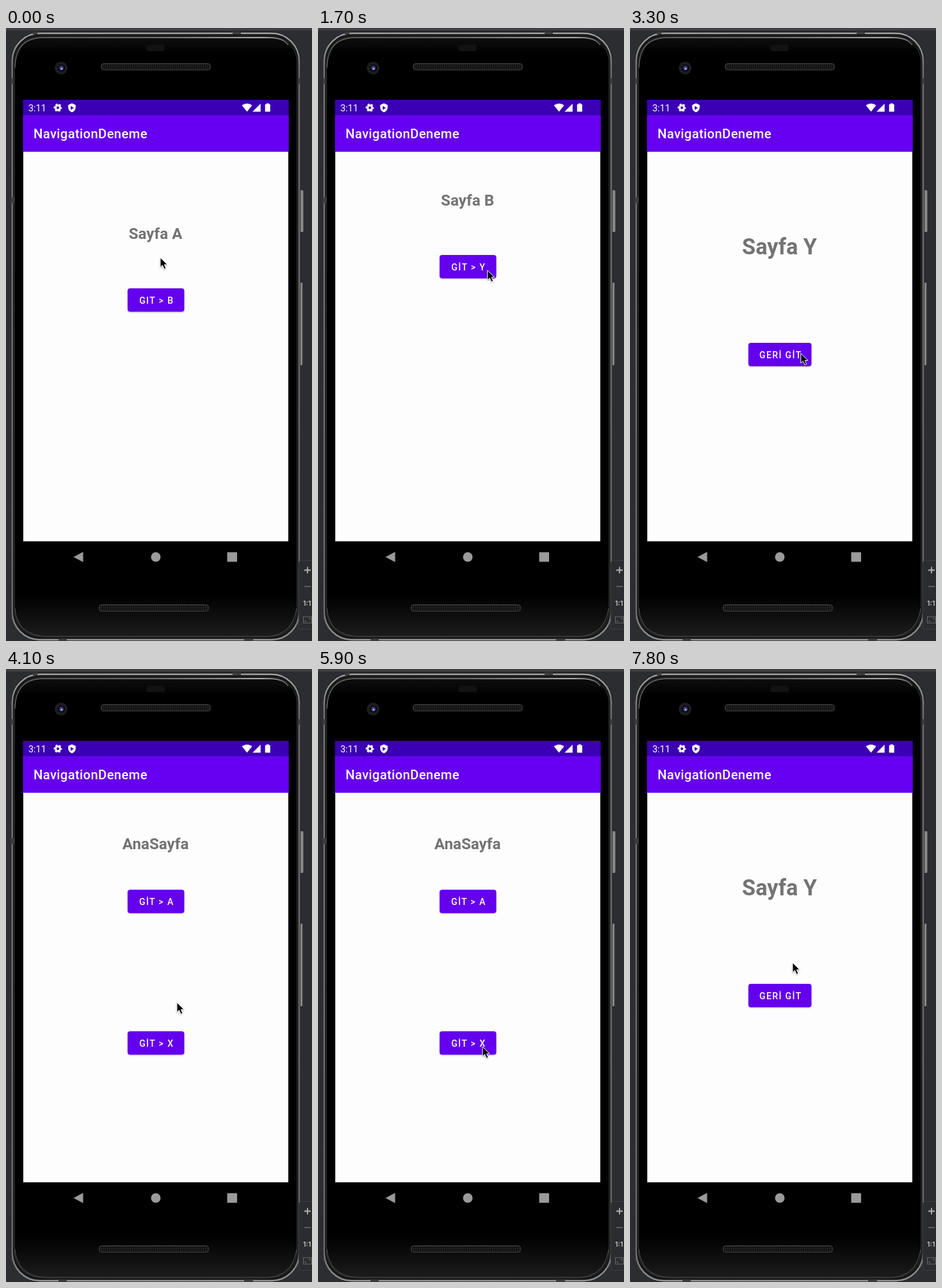
Recreate the animation shown at these times as an HTML page. Size 478x956 px, loop 8000 ms.

```html
<!DOCTYPE html>
<html lang="tr">
<head>
<meta charset="utf-8">
<style>
  html, body { margin: 0; width: 100%; height: 100%; overflow: hidden; background: #2c2d30; }
  svg { display: block; width: 100vw; height: 100vh; font-family: Roboto, sans-serif; }
  .title { font-weight: 700; fill: #737373; text-anchor: middle; }
  .label { font-weight: 500; font-size: 14.1px; letter-spacing: 1.35px; fill: #fff; text-anchor: middle; }
  .btn { fill: #6400ee; filter: drop-shadow(0 1px 1px rgba(0,0,0,.22)); }
  .pressed .btn { filter: drop-shadow(0 3px 3px rgba(0,0,0,.32)); }
</style>
</head>
<body>
<svg viewBox="0 0 478 956" preserveAspectRatio="none">
  <defs>
    <linearGradient id="body" x2="0" y2="1">
      <stop offset="0" stop-color="#101010"/><stop offset=".03" stop-color="#000"/>
      <stop offset=".93" stop-color="#000"/><stop offset="1" stop-color="#1c1c1c"/>
    </linearGradient>
    <linearGradient id="rim" x2="0" y2="1">
      <stop offset="0" stop-color="#a0a0a0"/><stop offset=".06" stop-color="#707070"/>
      <stop offset=".95" stop-color="#686868"/><stop offset="1" stop-color="#959595"/>
    </linearGradient>
    <linearGradient id="shine">
      <stop offset="0" stop-color="#666"/><stop offset=".5" stop-color="#888"/>
      <stop offset=".9" stop-color="#ddd"/><stop offset="1" stop-color="#666"/>
    </linearGradient>
    <linearGradient id="key">
      <stop offset="0" stop-color="#444"/><stop offset=".6" stop-color="#999"/><stop offset="1" stop-color="#555"/>
    </linearGradient>
    <pattern id="mesh" width="3" height="3" patternUnits="userSpaceOnUse">
      <rect width="3" height="3" fill="#0c0c0c"/><circle cx="1.5" cy="1.5" r=".9" fill="#363636"/>
    </pattern>
    <rect id="speaker" x=".5" y=".5" width="171" height="10" rx="4" fill="url(#mesh)" stroke="#444"/>
  </defs>

  <rect width="478" height="956" fill="#2c2d30"/>
  <rect width="478" height="4" fill="#3d3f41"/>

  <g fill="url(#key)">
    <rect x="458" y="253" width="7" height="65" rx="2"/>
    <rect x="458" y="397" width="5.5" height="129" rx="2"/>
  </g>
  <rect x="8" y="6" width="452" height="949.5" rx="45" fill="#1a1a1a"/>
  <rect x="9.7" y="8.2" width="448.300" height="945.800" rx="43" fill="#161616" stroke="url(#rim)" stroke-width="2.600"/>
  <rect x="13.5" y="13" width="441" height="936" rx="40" fill="url(#body)" stroke="#303030"/>
  <path d="M14 62Q15 15 58 15H410Q434 15 441 27" fill="none" stroke="url(#shine)" stroke-width="1.3"/>
  <path d="M14 905Q17 947 62 949H408Q448 947 454 905" fill="none" stroke="#4a4a4a" stroke-width="1.2"/>
  <g fill="#3b3b3b">
    <rect x="7" y="78" width="5" height="9"/><rect x="7" y="264" width="6" height="9"/>
    <rect x="456" y="78" width="4" height="9"/>
    <rect x="42" y="6" width="7" height="4"/><rect x="354" y="6" width="13" height="4"/>
    <rect x="82" y="952" width="13" height="4"/><rect x="372" y="952" width="14" height="4"/>
  </g>

  <rect x="219" y="26" width="29" height="10" rx="4" fill="#121212"/>
  <circle cx="86" cy="62.5" r="10" fill="#1d1d1f"/>
  <circle cx="86.5" cy="62.5" r="6" fill="#0b0b16"/>
  <circle cx="86.5" cy="62.5" r="3.4" fill="#3a4080"/>
  <circle cx="87" cy="63.5" r="1.5" fill="#aab2ea"/>
  <use href="#speaker" x="148" y="55"/>
  <use href="#speaker" x="145" y="899"/>

  <rect x="27" y="112" width="414" height="688.5" fill="#fdfdfd"/>
  <rect x="26.5" y="112" width="415.2" height="24.5" fill="#3b00b3"/>
  <rect x="26.5" y="136" width="415.2" height="57" fill="#6600f0"/>
  <text x="35" y="130" font-size="14.4" fill="#fff">3:11</text>
  <text x="43" y="172" font-size="20.2" font-weight="500" letter-spacing=".38" fill="#fff">NavigationDeneme</text>

  <g fill="#fff">
    <circle cx="81" cy="124.3" r="3.6" fill="none" stroke="#fff" stroke-width="3"/>
    <circle cx="81" cy="124.3" r="5.5" fill="none" stroke="#fff" stroke-width="2" stroke-dasharray="2.88" stroke-dashoffset="1.44"/>
    <path d="M103 117.5L108.800 120V124.500Q108.300 129.500 103 131.500Q97.700 129.500 97.200 124.500V120Z"/>
    <path d="M101 121.5L106 124.6L101 127.7Z" fill="#3b00b3"/>
    <path d="M368.500 120.500Q376.500 115 384.500 120.500L376.500 130.500Z"/>
    <path d="M397.700 118V130.500H385.200Z"/>
    <path d="M406.700 117.500H410.700V119H412.700V130.500H404.700V119H406.700Z"/>
  </g>

  <g id="pages"></g>

  <g fill="#9a9a9a">
    <path d="M105.5 825L120.500 817V833Z"/>
    <circle cx="234" cy="825" r="7.5"/>
    <rect x="345.5" y="817.5" width="15.5" height="15" rx="1"/>
  </g>

  <rect x="457.5" y="830.5" width="26" height="107" rx="4" fill="#2b2c2f" stroke="#3d3e40"/>
  <path d="M466 845.5H476M471 840.5V850.5" stroke="#b4b4b4" stroke-width="1.8"/>
  <path d="M466 871H476" stroke="#66686a" stroke-width="1.5"/>
  <text x="464" y="901" font-size="10.5" font-weight="700" font-family="Inter, sans-serif" fill="#b4b4b4">1:1</text>
  <rect x="464.5" y="918" width="13" height="10" fill="none" stroke="#67696b"/>
  <path d="M467 923.5V925.5H469.5M472.5 920.5H475V922.5" fill="none" stroke="#67696b"/>

  <path id="cursor" d="M0 0V15.2L3.5 12L6.1 18L8.9 16.8L6.4 11H11.2Z" fill="#000" stroke="#fff" stroke-width="1"
    stroke-linejoin="round" style="filter:drop-shadow(0 1px 1px rgba(0,0,0,.35))"/>
</svg>
<script>
  const LOOP = 8000, STEP = 100;
  // title, baseline, font size, then buttons: label, top, width
  const pages = {
    a: ['Sayfa A', 328.7, 24.17, [['GIT > B', 406, 88.5]]],
    b: ['Sayfa B', 276.5, 24.17, [['GİT > Y', 354, 88.5]]],
    y: ['Sayfa Y', 353.3, 34.25, [['GERİ GİT', 491, 98.5]]],
    home: ['AnaSayfa', 281, 24.17, [['GİT > A', 344.3, 88.5], ['GİT > X', 565, 88.5]]],
    x: ['SAYFA X', 362.8, 24.17, [['GİT > Y', 440.2, 88.5]]]
  };
  // start, page, pressed
  const states = [
    [0, 'a'], [900, 'a', true], [1000, 'b'], [2100, 'b', true], [2200, 'y'],
    [3700, 'y', true], [3800, 'home'], [6000, 'x'], [7400, 'x', true], [7500, 'y']
  ];
  // time, x, y of the pointer tip
  const path = [
    [0, 241, 358], [600, 257, 419], [1000, 257, 419], [1800, 265, 376], [2400, 265, 376],
    [3500, 267, 520], [4600, 267, 520], [5300, 257, 589], [6400, 257, 589], [7000, 254, 458], [LOOP, 254, 458]
  ];

  const button = ([text, top, w]) =>
    `<rect class="btn" x="${234.2 - w / 2}" y="${top}" width="${w}" height="36.5" rx="4"/>
     <text class="label" x="235.3" y="${top + 23.8}">${text.replace('>', '&gt;')}</text>`;

  const holder = document.getElementById('pages');
  const cursor = document.getElementById('cursor');
  holder.innerHTML = Object.entries(pages).map(([id, [title, y, size, buttons]]) =>
    `<g id="page-${id}"><text class="title" x="233.6" y="${y}" font-size="${size}">${title}</text>
     ${buttons.map(button).join('')}</g>`).join('');

  const ease = p => p * p * (3 - 2 * p);

  function pointer(t) {
    const i = path.findIndex(k => k[0] > t);
    const [t0, x0, y0] = path[i - 1], [t1, x1, y1] = path[i];
    const p = ease((t - t0) / (t1 - t0));
    return [x0 + (x1 - x0) * p, y0 + (y1 - y0) * p];
  }

  function draw(now) {
    const t = Math.floor((now % LOOP) / STEP) * STEP;
    const [, page, pressed] = states.filter(s => s[0] <= t).pop();
    for (const id in pages) {
      const g = document.getElementById('page-' + id);
      g.style.display = id === page ? '' : 'none';
      g.classList.toggle('pressed', !!pressed);
    }
    cursor.setAttribute('transform', `translate(${pointer(t)})`);
  }

  const start = performance.now();
  function tick() {
    draw(performance.now() - start);
    requestAnimationFrame(tick);
  }
  tick();
</script>
</body>
</html>
```
